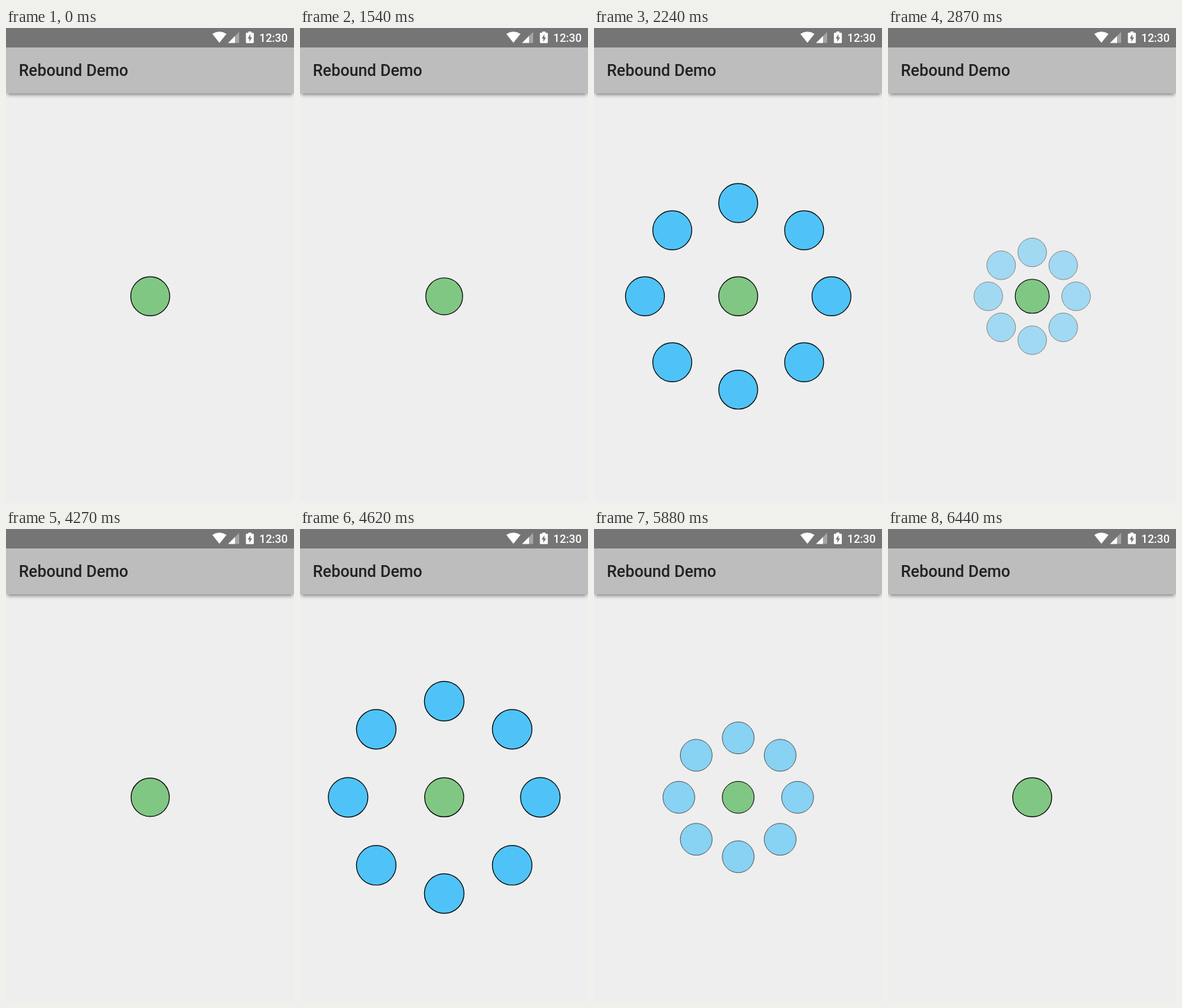
An HTML page that plays this animation: 415 px wide and 681 px high, repeating every 7.14 s.

```html
<!DOCTYPE html>
<html lang="en">
<head>
<meta charset="utf-8">
<title>Rebound Demo</title>
<style>
  html, body { margin: 0; width: 100%; height: 100%; overflow: hidden; background: #eee; }
  svg { display: block; width: 415px; height: 681px; }
  text { font-family: Roboto, "Noto Sans", sans-serif; font-weight: 500; }
</style>
</head>
<body>
<svg viewBox="0 0 415 681" xmlns="http://www.w3.org/2000/svg">
  <defs>
    <filter id="soft" x="-10%" y="-40%" width="120%" height="180%">
      <feGaussianBlur stdDeviation="2.6"/>
    </filter>
  </defs>
  <rect width="415" height="681" fill="#eee"/>
  <rect x="2" y="32" width="411" height="64.5" fill="#000" opacity=".42" filter="url(#soft)"/>
  <rect y="28" width="415" height="66" fill="#bdbdbd"/>
  <rect width="415" height="28" fill="#757575"/>

  <g fill="#fff">
    <path d="M307.5 21.2 297.3 8.6Q307.5 1.8 317.7 8.6Z"/>
    <path d="M336 5.5V21.5H320Z" opacity=".35"/>
    <path d="M330 11.5V21.5H320Z"/>
    <path d="M349.3 5h4.2v1.7h2.4q1.2 0 1.2 1.2v12.7q0 1.2-1.2 1.2h-9q-1.2 0-1.2-1.2V7.9q0-1.2 1.2-1.2h2.4Z"/>
    <path d="M352.2 9v4.6h2.4L350.6 20v-4.8h-2.4Z" fill="#757575"/>
    <text x="365" y="20" font-size="16.1">12:30</text>
  </g>
  <text x="18.4" y="69" font-size="23.05" fill="#212121">Rebound Demo</text>

  <g id="flower" transform="translate(207.8 386.3)" stroke="#000" stroke-width="1.2"></g>
</svg>
<script>
const LOOP = 7140, STEP = 70;
const PETALS = 8, REACH = 134.5, RADIUS = 28.1;
const PRESSED = 0.5, PETAL_MIN = 0.5;

// Each tap: press time, release time, direction of the petals.
const taps = [
  { down: 1505, up: 1590, dir: 1 },
  { down: 2723, up: 2770, dir: -1 },
  { down: 4251, up: 4355, dir: 1 },
  { down: 5745, up: 5805, dir: -1 }
];

// Step response of a damped spring with unit mass.
const TENSION = 230.2, FRICTION = 22;
const decay = FRICTION / 2;
const omega = Math.sqrt(TENSION - decay * decay);
function spring(ms) {
  if (ms <= 0) return 0;
  const t = ms / 1000;
  return 1 - Math.exp(-decay * t) * (Math.cos(omega * t) + decay / omega * Math.sin(omega * t));
}

const flower = document.getElementById("flower");
function addCircle(fill) {
  const c = document.createElementNS("http://www.w3.org/2000/svg", "circle");
  c.setAttribute("r", RADIUS);
  c.setAttribute("fill", fill);
  return flower.appendChild(c);
}
const petals = Array.from({ length: PETALS }, () => addCircle("#4fc3f7"));
const core = addCircle("#81c784");

function draw(time) {
  const t = Math.floor(time % LOOP / STEP) * STEP;
  let open = 0, press = 0;
  for (const { down, up, dir } of taps) {
    open += dir * spring(t - up);
    press += spring(t - down) - spring(t - up);
  }
  core.setAttribute("transform", `scale(${1 - (1 - PRESSED) * press})`);

  const scale = PETAL_MIN + (1 - PETAL_MIN) * open;
  const alpha = open < 0.003 ? 0 : Math.min(1, open);
  petals.forEach((petal, i) => {
    const angle = i / PETALS * 2 * Math.PI;
    const x = REACH * open * Math.cos(angle);
    const y = REACH * open * Math.sin(angle);
    petal.setAttribute("transform", `translate(${x} ${y}) scale(${scale})`);
    petal.setAttribute("opacity", alpha);
  });
}

const start = performance.now();
function tick() {
  draw(performance.now() - start);
  requestAnimationFrame(tick);
}
tick();
</script>
</body>
</html>
```
